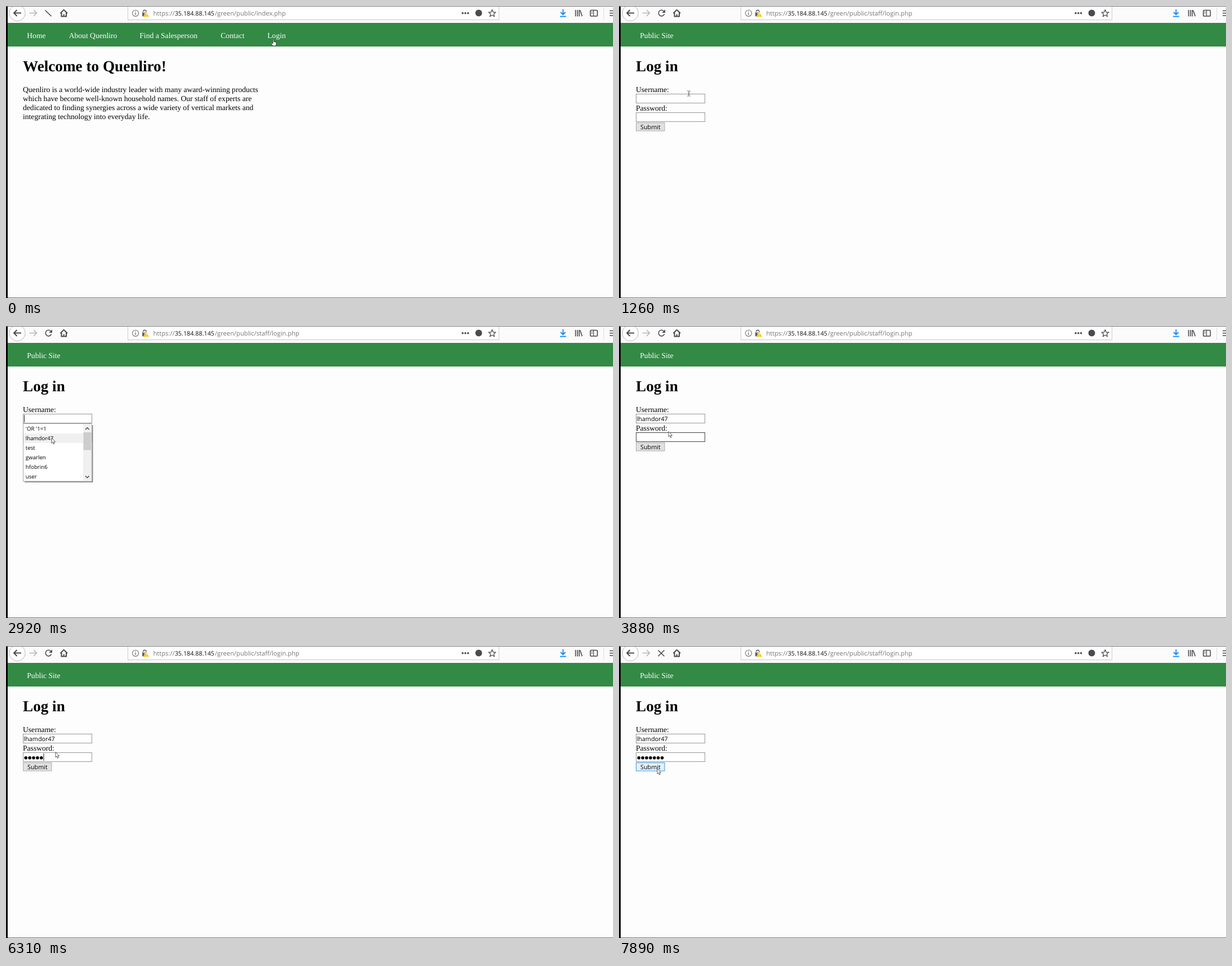
Recreate the animation shown at these times as an HTML page. Size 1078x519 px, loop 8000 ms.

```html
<!DOCTYPE html>
<html lang="en">
<head>
<meta charset="utf-8">
<title>Login walkthrough</title>
<style>
  html, body { margin: 0; width: 100%; height: 100%; overflow: hidden; background: #fdfdfd; }
  svg { display: block; width: 1078px; height: 519px; }
  text { text-rendering: geometricPrecision; white-space: pre; }
  .page { font: 13.6px "Liberation Serif", "Times New Roman", serif; }
  .title { font-size: 27.2px; font-weight: bold; }
  .nav { fill: #fff; }
  .url { font: 11.2px "Open Sans", "Noto Sans", sans-serif; fill: #77777a; }
  .form { font: 10.8px "Open Sans", "Noto Sans", sans-serif; }
  .list { font: 9.7px "Open Sans", "Noto Sans", sans-serif; }
  .icon { fill: none; stroke: #4a4a4f; stroke-width: 1.6; }
</style>
</head>
<body>
<svg viewBox="0 0 1078 519">
  <rect width="1078" height="519" fill="#fdfdfd"/>

  <!-- browser toolbar -->
  <rect width="1078" height="30" fill="#fbfbfc"/>
  <rect x="216.5" y="-4" width="659" height="28.5" fill="#fff" stroke="#c9c9cb"/>
  <circle cx="20" cy="12.5" r="14.2" fill="#fff" stroke="#b9b9bb"/>
  <g class="icon">
    <path d="M27 12.5H14M19.500 7L14 12.500L19.500 18" stroke-width="2"/>
    <path d="M41.500 12.500H54.500M49 7L54.500 12.500L49 18" stroke="#b5b5b8"/>
    <path d="M96.500 13L102.700 6.800L109 13M98.500 12V18.500H107V12M102.700 18V14.500"  stroke-width="2"/>
    <circle cx="230" cy="12.800" r="5.600" stroke="#737376" stroke-width="1.100"/>
    <path d="M230 11.800V16M230 9.300V10.600" stroke="#737376" stroke-width="1.300"/>
    <path d="M243.500 12V9.500A2.800 2.800 0 0 1 249 9.500V11" stroke="#5c5c5f"/>
    <path d="M863.400 6.800L865.200 10.800L869.500 11.300L866.300 14.200L867.200 18.500L863.400 16.300L859.600 18.500L860.500 14.200L857.300 11.300L861.600 10.800Z" stroke-width="1.300"/>
    <path d="M1011.500 7V18.500M1014.800 7V18.500M1018 7V18.500M1019.500 7.500L1023.300 18.300"/>
    <rect x="1037.700" y="7.500" width="12.600" height="10.500" rx="1.800"/>
    <path d="M1043.500 7.500V18M1039.500 10.500H1042M1039.500 13H1042" stroke-width="1.200"/>
    <path d="M1072 8.500H1078M1072 12.700H1078M1072 17H1078"/>
    <path d="M989.300 6V15M985 11L989.300 15.300L993.600 11M984 18.700H994.700" stroke="#0a84ff" stroke-width="1.800"/>
  </g>
  <rect x="242" y="11.500" width="8" height="7" rx="1" fill="#5c5c5f"/>
  <path d="M241.500 7.500L250 18" stroke="#fff" stroke-width="1"/>
  <path d="M249 10L254.200 19.500H243.800Z" fill="#ffbf00" stroke="#fff" stroke-width=".6"/>
  <path d="M249 13V16.200M249 17.200V18.500" stroke="#fff" stroke-width="1.200"/>
  <g fill="#4a4a4f">
    <circle cx="811" cy="12.800" r="1.800"/><circle cx="815.800" cy="12.800" r="1.800"/><circle cx="820.600" cy="12.800" r="1.800"/>
    <circle cx="839.500" cy="12.500" r="6"/>
  </g>
  <path d="M1061.500 2V25" stroke="#dedee0"/>
  <g class="url">
    <text x="261.500" y="17">https://</text>
    <text x="299.700" y="17" font-size="10.800" style="font-size:10.8px;fill:#111">35.184.88.145</text>
    <text id="path" x="371" y="17"></text>
  </g>
  <g id="reload">
    <path class="icon" d="M80.600 14.300A5.300 5.300 0 1 1 79.300 8.700"/>
    <path d="M82 6.200V12H76.200Z" fill="#4a4a4f"/>
  </g>
  <path id="slash" class="icon" d="M69.500 7.500L80.500 18.300"/>
  <path id="cross" class="icon" d="M80.500 7.500L69.500 18.300"/>

  <rect y="30" width="1078" height="42" fill="#338a45"/>

  <g id="home" class="page">
    <g class="nav">
      <text x="37.300" y="57">Home</text>
      <text x="111.700" y="57">About Quenliro</text>
      <text x="237.300" y="57">Find a Salesperson</text>
      <text x="381.200" y="57">Contact</text>
      <text x="464.300" y="57">Login</text>
    </g>
    <text class="title" x="30" y="116">Welcome to Quenliro!</text>
    <text x="30" y="153">Quenliro is a world-wide industry leader with many award-winning products</text>
    <text x="30" y="169">which have become well-known household names. Our staff of experts are</text>
    <text x="30" y="185">dedicated to finding synergies across a wide variety of vertical markets and</text>
    <text x="30" y="201">integrating technology into everyday life.</text>
  </g>

  <g id="login">
    <g class="page">
      <text class="nav" x="37.300" y="57">Public Site</text>
      <text class="title" x="30" y="116">Log in</text>
      <text x="30" y="153">Username:</text>
      <text x="30" y="186">Password:</text>
    </g>
    <rect id="userBox" x="30.500" y="156.500" width="122" height="16" fill="#fff"/>
    <rect id="passBox" x="30.500" y="189.500" width="122" height="16" fill="#fff"/>
    <rect id="button" x="30.500" y="207.500" width="50.500" height="14.500"/>
    <g class="form">
      <text id="userText" x="31.500" y="168.700">lhamdor47</text>
      <text x="38" y="219">Submit</text>
    </g>
    <g id="dots"></g>
    <rect id="caret" width="1" height="13" fill="#222"/>
    <g id="menu">
      <path d="M33 277H153.500V176" fill="none" stroke="#8c8c8c" stroke-width="2"/>
      <rect x="30.500" y="173.500" width="121.500" height="102.500" fill="#fff" stroke="#a8a8a8"/>
      <rect id="row" x="31" width="106" height="17" fill="#f0f0f0"/>
      <rect x="137" y="174" width="14.500" height="101.500" fill="#f0f0f0"/>
      <rect x="137.500" y="189" width="13.500" height="31.500" fill="#cdcdcd"/>
      <path d="M141 184L144.300 180.700L147.600 184M141 266.500L144.300 269.800L147.600 266.500" fill="none" stroke="#444" stroke-width="1.500"/>
      <g id="names" class="list"></g>
    </g>
  </g>

  <rect width="3" height="519" fill="#000"/>
  <path d="M0 .5H1078M3 518.500H1078" stroke="#77777a"/>

  <g id="arrow"><path d="M0 0V9.300L2.100 7.400L3.600 10.800L5.100 10.100L3.700 6.900H6.600Z" fill="#fff" stroke="#333" stroke-width=".8"/></g>
  <g id="beam"><path d="M-2.500 -4.500H-.7M.7 -4.500H2.500M0 -4V4M-2.500 4.500H-.7M.7 4.500H2.500" fill="none" stroke="#333"/></g>
  <g id="hand"><path d="M0 1C0 -.3 1.800 -.3 1.800 1V5L6 6V9L5 12.500H.2L-3 8.500C-3.500 7.300 -2 6.500 0 8.500Z" fill="#fff" stroke="#222" stroke-width=".8"/></g>
</svg>
<script>
const LOOP = 8000;
const $ = id => document.getElementById(id);
const show = (id, on) => $(id).setAttribute('visibility', on ? 'inherit' : 'hidden');
const set = (id, attrs) => { for (const k in attrs) $(id).setAttribute(k, attrs[k]); };
const within = (t, a, b) => t >= a && t < b;

// Last row whose start time has been reached.
const pick = (rows, t) => rows.reduce((found, row) => row[0] <= t ? row : found);

// time, x, y, pointer shape
const POINTER = [
  [0, 474, 58.500, 'hand'], [290, 442, 76, 'arrow'], [430, 380, 108, 'arrow'],
  [570, 300, 134, 'arrow'], [700, 228, 150, 'arrow'], [840, 178, 157, 'arrow'],
  [980, 145, 157, 'beam'], [1110, 130, 156, 'beam'], [1260, 124, 155.500, 'beam'],
  [1400, 117, 159, 'beam'], [1540, 111, 162, 'beam'], [1680, 107, 164, 'beam'],
  [2120, 97, 178, 'arrow'], [2260, 88, 197, 'arrow'], [2410, 81.700, 211, 'arrow'],
  [2550, 82, 208, 'arrow'], [2690, 82, 203, 'arrow'], [2840, 81, 199, 'arrow'],
  [3180, 84, 194, 'arrow'], [3320, 88, 187.500, 'arrow'], [4150, 88, 188.500, 'arrow'],
  [6870, 80, 202, 'arrow'], [6990, 70.500, 211, 'arrow'], [7120, 68, 217, 'arrow'],
  [7250, 67, 222, 'arrow'], [7380, 67, 224, 'arrow'], [7510, 67, 221, 'arrow'],
  [7640, 68, 218, 'arrow']
];
const SPINNER = [[0, 'slash'], [150, 'cross'], [290, 'reload'], [7510, 'slash'], [7640, 'cross']];
const BUTTON = [
  [0, '#e1e1e1', '#adadad'], [6990, '#e5f1fb', '#3c96df'],
  [7250, '#cce4f7', '#26669b'], [7380, '#e5f1fb', '#3c96df']
];
const NAMES = ["'OR '1=1", 'lhamdor47', 'test', 'gwarlen', 'hfobrin6', 'user'];
const TYPE_START = 5630, TYPE_STEP = 140, DOTS = 7;

function make(parent, tag, attrs, text = '') {
  const el = document.createElementNS('http://www.w3.org/2000/svg', tag);
  for (const k in attrs) el.setAttribute(k, attrs[k]);
  el.textContent = text;
  return $(parent).appendChild(el);
}
NAMES.forEach((name, i) => make('names', 'text', { x: 34.8, y: 186 + 17 * i }, name));
const dots = Array.from({ length: DOTS }, (_, i) =>
  make('dots', 'circle', { cx: 35.2 + 6.9 * i, cy: 198.7, r: 2.8 }));

function drawCaret(t, typed) {
  const inUser = within(t, 1540, 2070) || within(t, 2600, 3130);
  const inPass = within(t, 3470, 3880) || within(t, 4430, 4960) || within(t, 5490, 6990);
  show('caret', inUser || inPass);
  set('caret', { x: inUser ? 32 : 32 + 6.9 * typed, y: inUser ? 158 : 191 });
}

function draw(t) {
  const onLogin = t >= 290;
  show('home', !onLogin);
  show('login', onLogin);
  $('path').textContent = '/green/public/' + (onLogin ? 'staff/login.php' : 'index.php');

  const spin = pick(SPINNER, t)[1];
  show('reload', spin === 'reload');
  show('slash', spin !== 'reload');
  show('cross', spin === 'cross');

  const [, x, y, shape] = pick(POINTER, t);
  for (const id of ['arrow', 'beam', 'hand']) show(id, id === shape);
  set(shape, { transform: `translate(${x} ${y})` });
  if (!onLogin) {
    ['menu', 'caret', 'dots', 'userText'].forEach(id => show(id, false));
    return;
  }

  set('userBox', { stroke: within(t, 1400, 2120) ? '#555' : '#979797' });
  set('passBox', { stroke: within(t, 3470, 4150) ? '#444' : '#979797' });
  const [, fill, stroke] = pick(BUTTON, t);
  set('button', { fill, stroke });

  show('menu', within(t, 1980, 3180));
  const row = Math.floor((y - 174) / 17);
  show('row', within(t, 2120, 3180) && row >= 0);
  set('row', { y: 174 + 17 * Math.max(row, 0) });

  show('userText', t >= 3180);
  show('dots', true);
  const typed = Math.max(0, Math.min(DOTS, Math.floor((t - TYPE_START) / TYPE_STEP) + 1));
  dots.forEach((dot, i) => dot.setAttribute('visibility', i < typed ? 'inherit' : 'hidden'));
  drawCaret(t, typed);
}

function tick() {
  draw(performance.now() % LOOP);
  requestAnimationFrame(tick);
}
tick();
</script>
</body>
</html>
```
